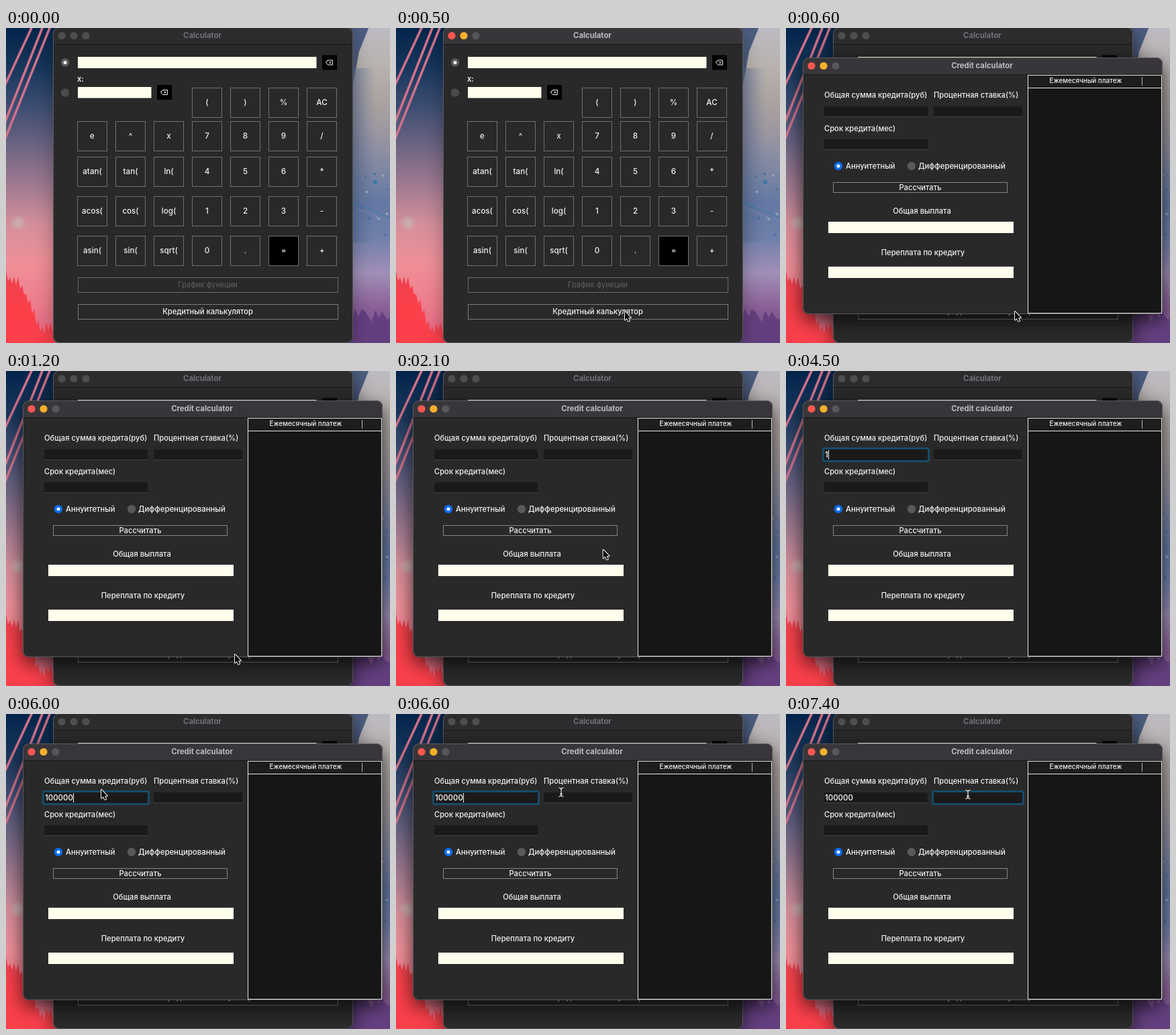
These frames come from a looping animation (572 px wide and 470 px high, 8 s). An HTML page with a canvas:

```html
<!DOCTYPE html>
<html lang="ru">
<head>
<meta charset="utf-8">
<title>Credit calculator</title>
<style>
  html, body { margin: 0; width: 100%; height: 100%; overflow: hidden; background: #222; }
  canvas { display: block; }
</style>
</head>
<body>
<canvas id="stage" width="572" height="470"></canvas>
<script>
const LOOP = 8000, STEP = 100;
const DIALOG_OPENS = 600;
const IVORY = '#fffdeb';
const ctx = document.getElementById('stage').getContext('2d');

// ---------- drawing helpers ----------
function rect(x, y, w, h, fill, stroke) {
  if (fill) { ctx.fillStyle = fill; ctx.fillRect(x, y, w, h); }
  if (stroke) {
    ctx.strokeStyle = stroke;
    ctx.lineWidth = 1;
    ctx.strokeRect(x + .5, y + .5, w - 1, h - 1);
  }
}

function dot(x, y, r, fill) {
  ctx.fillStyle = fill;
  ctx.beginPath();
  ctx.arc(x, y, r, 0, 7);
  ctx.fill();
}

function text(str, x, y, { size = 11.2, weight = 500, color = '#f2f2f2', align = 'center' } = {}) {
  ctx.font = `${weight} ${size}px Inter, "Open Sans", sans-serif`;
  ctx.fillStyle = color;
  ctx.textAlign = align;
  ctx.textBaseline = 'middle';
  ctx.fillText(str, x, y);
}

function line(points, color, width = 1) {
  ctx.strokeStyle = color;
  ctx.lineWidth = width;
  ctx.beginPath();
  points.forEach(([x, y]) => ctx.lineTo(x, y));
  ctx.stroke();
}

function polygon(points, fill) {
  ctx.fillStyle = fill;
  ctx.beginPath();
  points.forEach(([x, y]) => ctx.lineTo(x, y));
  ctx.closePath();
  ctx.fill();
}

function verticalGradient(y0, y1, colors) {
  const g = ctx.createLinearGradient(0, y0, 0, y1);
  colors.forEach((c, i) => g.addColorStop(i / (colors.length - 1), c));
  return g;
}

function radio(x, y, on, color) {
  dot(x, y, 6.2, color);
  if (on) dot(x, y, 2.5, '#fff');
}

function seeded(seed) {
  return () => (seed = (seed * 16807) % 2147483647) / 2147483647;
}

// ---------- wallpaper ----------
function wallpaper() {
  rect(0, 0, 300, 470, verticalGradient(0, 470,
    ['#03244a', '#17365c', '#3d4d72', '#6d6482', '#a07a90', '#d58f9a', '#f08f98', '#ee7d8e', '#e4647f']));
  for (const [x, y] of [[38, 82], [54, 137], [65, 162]]) {
    line([[x * 1.1, -y * .1], [-x * .1, y * 1.1]], '#cf7189', 3.6);
  }

  const glow = ctx.createRadialGradient(18, 291, 3, 18, 291, 13);
  glow.addColorStop(0, 'rgba(200,180,180,.8)');
  glow.addColorStop(1, 'rgba(200,180,180,0)');
  rect(0, 275, 35, 32, glow);

  const rand = seeded(41);
  const trees = [[0, 470]];
  for (let x = 0; x <= 72; x += 3) {
    const top = 364 + Math.max(0, x - 18) * 2.3;
    trees.push([x, Math.min(top, 440) + (x % 2 ? 10 : -2) + rand() * 10]);
  }
  trees.push([72, 470]);
  polygon(trees, verticalGradient(355, 470, ['#e8414e', '#fb4049', '#fa3f4b']));

  // planet on the right edge, with haze and hills below
  rect(300, 0, 272, 470, verticalGradient(0, 470,
    ['#bdbbc2', '#b9b3b1', '#aca4a0', '#9c96a0', '#8088a3', '#6478a4', '#7180ab', '#a18fb8', '#8a5f96', '#6a4384']));
  polygon([[505, -2], [541, -2], [526, 35], [515, 95], [505, 95]], '#4d5d80');
  const haze = ctx.createLinearGradient(515, 0, 550, 0);
  haze.addColorStop(0, 'rgba(90,110,150,.6)');
  haze.addColorStop(1, 'rgba(90,110,150,0)');
  rect(515, 60, 35, 260, haze);
  for (let i = 0; i < 16; i++) {
    const x = 530 + rand() * 42, y = 185 + rand() * 130;
    dot(x, y, .6 + rand() * 1.6, i % 3 ? 'rgba(50,105,155,.6)' : 'rgba(205,195,195,.5)');
  }
  dot(550, 230, 3, '#3a78a8');
  line([[505, 255], [575, 284]], '#4f7ba8', 2);
  line([[505, 262], [575, 291]], '#7089ad', 1);

  const hills = [[510, 470]];
  for (let x = 510; x <= 575; x += 5) hills.push([x, 418 + rand() * 22]);
  hills.push([575, 470]);
  polygon(hills, '#643f80');
}

// ---------- windows ----------
function windowFrame(x, y, w, h, title, active, shadow) {
  ctx.save();
  ctx.shadowColor = `rgba(0,0,0,${shadow})`;
  ctx.shadowBlur = 28;
  ctx.shadowOffsetY = 9;
  ctx.fillStyle = '#2a292a';
  ctx.beginPath();
  ctx.roundRect(x, y, w, h, 9);
  ctx.fill();
  ctx.restore();

  ctx.save();
  ctx.clip();
  rect(x, y, w, 25, active ? '#38363a' : '#2d2b2e');
  rect(x, y + 25, w, 1, '#171617');
  ctx.restore();

  ctx.strokeStyle = '#5c5b5d';
  ctx.lineWidth = 1;
  ctx.beginPath();
  ctx.roundRect(x + .5, y + .5, w - 1, h - 1, 9);
  ctx.stroke();

  const lights = active ? ['#fe5751', '#f8b02c', '#58565a'] : Array(3).fill('#4f4d50');
  lights.forEach((c, i) => dot(x + 13 + i * 18, y + 12.5, 5.6, c));
  text(title, x + w / 2 - 1, y + 12.5, { size: 11.3, weight: 700, color: active ? '#bdbbbf' : '#737175' });
}

function backspaceKey(x, y) {
  rect(x, y, 22, 22, '#000');
  const cx = x + 11, cy = y + 11;
  line([[cx - 5.5, cy], [cx - 2.5, cy - 3.5], [cx + 4.5, cy - 3.5], [cx + 4.5, cy + 3.5],
    [cx - 2.5, cy + 3.5], [cx - 5.5, cy], [cx - 2.5, cy - 3.5]], '#eee');
  line([[cx - .8, cy - 1.7], [cx + 2.6, cy + 1.7]], '#eee');
  line([[cx - .8, cy + 1.7], [cx + 2.6, cy - 1.7]], '#eee');
}

const KEY_ROWS = [
  [89, ['', '', '', '(', ')', '%', 'AC']],
  [139, ['e', '^', 'x', '7', '8', '9', '/']],
  [192, ['atan(', 'tan(', 'ln(', '4', '5', '6', '*']],
  [251, ['acos(', 'cos(', 'log(', '1', '2', '3', '-']],
  [310, ['asin(', 'sin(', 'sqrt(', '0', '.', '=', '+']],
];

function calculator(active, shadow) {
  windowFrame(70, -1, 447, 471, 'Calculator', active, shadow);
  radio(88, 51.5, true, '#5b5a5b');
  radio(88, 96.5, false, '#4c4b4c');
  rect(107, 43, 355.5, 17, IVORY);
  rect(107, 88, 109.5, 16.5, IVORY);
  backspaceKey(471, 40.5);
  backspaceKey(225, 85);
  text('x:', 106, 76.5, { weight: 600, align: 'left' });

  for (const [y, labels] of KEY_ROWS) {
    labels.forEach((label, col) => {
      if (!label) return;
      const x = 106 + col * 57;
      rect(x, y, 45, 45, label === '=' ? '#000' : null, '#706f70');
      text(label, x + 22.5, y + 22.5, { size: 11.6 });
    });
  }
  rect(107, 372, 388, 23, null, '#6c6b6c');
  text('График функции', 300.5, 383.5, { weight: 400, color: '#626162' });
  rect(107, 412, 388, 23, null, '#7c7b7c');
  text('Кредитный калькулятор', 300.5, 423.5);
}

function field(x, y, w, { focused, value = '', caret }) {
  if (focused) {
    ctx.strokeStyle = '#164c67';
    ctx.lineWidth = 3;
    ctx.beginPath();
    ctx.roundRect(x - 1.5, y - 1.5, w + 3, 19, 2);
    ctx.stroke();
  }
  rect(x, y, w, 16, '#1b1a1b');
  if (!focused) rect(x, y + 15, w, 1, '#434243');
  text(value, x + 1, y + 8.5, { size: 11.5, align: 'left', color: '#fff' });
  if (caret) rect(x + 1 + Math.round(ctx.measureText(value).width), y + 1, 1, 14, '#eee');
}

function creditDialog(state) {
  windowFrame(25, 44, 536, 383, 'Credit calculator', true, .7);
  const left = { align: 'left' };
  text('Общая сумма кредита(руб)', 57, 100.5, left);
  text('Процентная ставка(%)', 220, 100.5, left);
  text('Срок кредита(мес)', 57, 150.5, left);
  field(57, 117, 154, state.amount);
  field(220, 117, 132, state.rate);
  field(57, 166, 154, {});

  radio(78, 206, true, '#0a6cf0');
  text('Аннуитетный', 89, 206.5, left);
  radio(187, 206, false, '#5a595a');
  text('Дифференцированный', 197, 206.5, { align: 'left', size: 11.4 });

  rect(70, 230, 260, 16, null, '#858485');
  text('Рассчитать', 200, 238.5);
  text('Общая выплата', 202.5, 273.5);
  rect(63, 289, 276, 17, IVORY);
  text('Переплата по кредиту', 204, 336);
  rect(63, 356, 276, 17, IVORY);

  rect(360, 70, 200, 356, '#171617', '#e4e4e4');
  rect(360, 70, 200, 20, '#1e1d1e', '#e4e4e4');
  rect(530, 73, 1, 13, '#b5b5b5');
  text('Ежемесячный платеж', 446.5, 79.5, { size: 9.9 });
}

// ---------- pointer ----------
const ARROW = [[0, 0], [0, 12.6], [2.9, 9.9], [5, 14.7], [7.1, 13.8], [5, 9.2], [8.9, 9.2]];

function arrow(x, y) {
  const points = ARROW.map(([dx, dy]) => [x + dx, y + dy]);
  ctx.lineJoin = 'round';
  line([...points, points[0], points[1]], '#f4f4f4', 2);
  polygon(points, '#0a0a0a');
  ctx.lineJoin = 'miter';
}

function iBeam(x, y) {
  const strokes = [
    [[x - 3.5, y - 6.5], [x - 1.2, y - 6], [x, y - 4.5], [x + 1.2, y - 6], [x + 3.5, y - 6.5]],
    [[x, y - 5], [x, y + 5]],
    [[x - 3.5, y + 6.5], [x - 1.2, y + 6], [x, y + 4.5], [x + 1.2, y + 6], [x + 3.5, y + 6.5]],
    [[x - 2, y + 2.5], [x + 2, y + 2.5]],
  ];
  strokes.forEach(s => line(s, '#111', 3));
  strokes.forEach(s => line(s, '#f0f0f0', 1.3));
}

// Each move: start and end time, then start, control and end points of a curve.
const MOVES = [
  { from: 0, to: 400, path: [[318, 474], [338, 450], [341, 423]] },
  { from: 1700, to: 2600, path: [[341, 423], [364, 262], [170, 127]] },
  { from: 6000, to: 6800, path: [[142, 113], [205, 110], [271, 120]] },
];

function pointerAt(t) {
  const { from, to, path: [a, b, c] } = MOVES.findLast(m => t >= m.from);
  const p = Math.min(1, (t - from) / (to - from));
  const u = 1 - (1 - p) ** 1.2;
  return [0, 1].map(i => (1 - u) ** 2 * a[i] + 2 * u * (1 - u) * b[i] + u * u * c[i]);
}

function pointer(t) {
  if (t < 100 || (t >= 4400 && t < 6000)) return;
  const [x, y] = pointerAt(t);
  const overField = t >= DIALOG_OPENS && y > 115 && y < 134 && (x < 211 || x > 220);
  (overField ? iBeam : arrow)(x, y);
}

// ---------- timeline ----------
const TYPED = [[0, ''], [4400, '1'], [4700, '100'], [5100, '1000'], [5300, '10000'], [5500, '100000']];
const CARET_ON = [[2700, 3100], [3600, 4100], [4400, 6100], [6600, 7400]];

function render(t) {
  const dialogOpen = t >= DIALOG_OPENS;
  wallpaper();
  calculator(t >= 100 && !dialogOpen, dialogOpen ? .6 : .3);
  if (dialogOpen) {
    const caret = CARET_ON.some(([on, off]) => t >= on && t < off);
    const inAmount = t >= 2700 && t < 6900;
    const inRate = t >= 6900;
    creditDialog({
      amount: { focused: inAmount, caret: caret && inAmount, value: TYPED.findLast(k => t >= k[0])[1] },
      rate: { focused: inRate, caret: caret && inRate },
    });
  }
  pointer(t);
}

function tick() {
  const t = performance.now() % LOOP;
  render(Math.floor(t / STEP) * STEP);
  requestAnimationFrame(tick);
}
tick();
</script>
</body>
</html>
```
